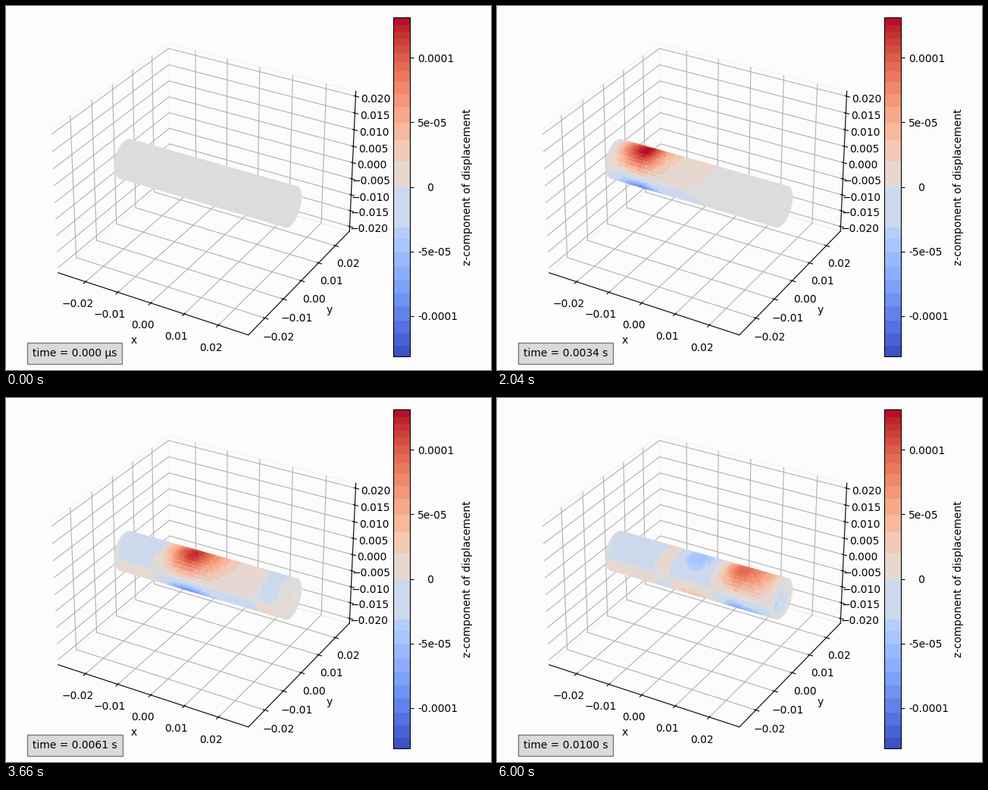
Animation, 640 px wide and 480 px high, one loop 6.06 s. Source, as a matplotlib script:

```python
import numpy as np
import matplotlib.pyplot as plt
from matplotlib.animation import FuncAnimation
from matplotlib.cm import ScalarMappable
from matplotlib.colors import ListedColormap, Normalize

W, H, DPI = 640, 480, 100
FRAMES, STEP_MS = 101, 60
BG = "#fcfcfc"
PEAK = 1.313e-4              # colour range limit
LENGTH, RADIUS = 0.05, 0.005
N_AXIAL, N_ROUND = 51, 32
LIMIT = 0.0275 * 25 / 24


def banded_map():
    """coolwarm reduced to flat bands, coarse around zero."""
    up = [0.007, .154, .28, .38, .47, .55, .62, .68, .74, .79, .84, .88, .92, .96, 1]
    down = [1, .94, .87, .79, .71, .63, .55, .47, .39, .31, .235, .007]
    edges = np.array([-d for d in down] + up)
    mids = (edges[:-1] + edges[1:]) / 2
    v = np.linspace(-1, 1, 257)
    band = np.clip(np.searchsorted(edges, v) - 1, 0, len(mids) - 1)
    return ListedColormap(plt.get_cmap("coolwarm")(mids[band] / 2 + 0.5))


def radial(s, t):
    """Radial displacement at axial position s (0..1) and time t in ms."""
    ramp = np.sin(np.pi / 2 * min(t / 2.4, 1)) ** 2
    late = max(t - 4.5, 0) / 5.5
    xi = s - (0.0873 * t - 0.093)

    lead = np.exp(-(np.maximum(xi, 0) / (0.06 + 0.017 * t)) ** 1.4)
    back = 0.22 - 0.08 * late
    tail = np.cos(np.pi / 2 * np.clip(-xi / back, 0, 1)) ** 1.3

    q = (-xi - back) / 0.25
    depth = np.clip(0.06 + 0.06 * (t - 4.5), 0.03, 0.37)
    wake = np.select(
        [q <= 0, q < 1, q < 1.35],
        [0 * q, -depth * np.sin(np.pi * q), 0.02 * np.sin(np.pi * (q - 1) / 0.35)],
        -0.06 * np.tanh((q - 1.35) / 0.1))

    main = np.where(xi > 0, lead, tail) * 1.32e-4 * ramp * (1 - 0.28 * late)
    ahead = -8e-6 * np.exp(-((s - 0.91) / 0.06) ** 2) * np.exp(-((t - 5.2) / 1.3) ** 4)
    ends = np.tanh(s / 0.05) * np.tanh((1 - s) / 0.05)
    return (main + PEAK * wake * ramp + ahead) * ends


plt.rcParams["font.family"] = "DejaVu Sans"
fig = plt.figure(figsize=(W / DPI, H / DPI), dpi=DPI, facecolor=BG)


def px_rect(x, y, w, h):
    return [x / W, y / H, w / W, h / H]


ax = fig.add_axes(px_rect(35, 18, 447, 447), projection="3d", facecolor="none")
ax.view_init(30, -60)
ax.set_xlim(-LIMIT, LIMIT)
ax.set_ylim(-LIMIT, LIMIT)
ax.set_zlim(-0.75 * LIMIT, 0.75 * LIMIT)
ax.set_xticks(np.arange(-2, 3) * 0.01)
ax.set_yticks(np.arange(-2, 3) * 0.01)
ax.set_zticks(np.arange(-4, 5) * 0.005)
ax.set_xlabel("x")
ax.set_ylabel("y")
for axis in (ax.xaxis, ax.yaxis, ax.zaxis):
    axis.pane.fill = False
    axis.pane.set_edgecolor("#ececec")

s, theta = np.meshgrid(np.linspace(0, 1, N_AXIAL),
                       np.arange(N_ROUND) * 2 * np.pi / N_ROUND)
s, theta = s.ravel(), theta.ravel()
lift = np.sin(theta)
cmap, norm = banded_map(), Normalize(-PEAK, PEAK)
dots = ax.scatter(LENGTH * (s - 0.5), RADIUS * np.cos(theta), RADIUS * lift,
                  c=0 * s, cmap=cmap, norm=norm, s=17.5, linewidths=0,
                  depthshade=False)

cax = fig.add_axes(px_rect(511, 18, 22.35, 447))
bar = fig.colorbar(ScalarMappable(norm, cmap), cax=cax, format="%4g",
                   ticks=np.arange(-2, 3) * 5e-5)
bar.set_label("z-component of displacement")

clock = ax.text2D(0, 0, "", transform=ax.transAxes,
                  bbox=dict(facecolor="#dadada", edgecolor="#7a7a7a", pad=5))


def update(i):
    dots.set_array(radial(s, i * 0.1) * lift)
    clock.set_text(f"time = {i * 1e-4:.4f} s" if i else "time = 0.000 µs")
    return dots, clock


anim = FuncAnimation(fig, update, frames=FRAMES, interval=STEP_MS,
                     init_func=lambda: update(0), repeat=True, repeat_delay=0)
plt.show()
```
